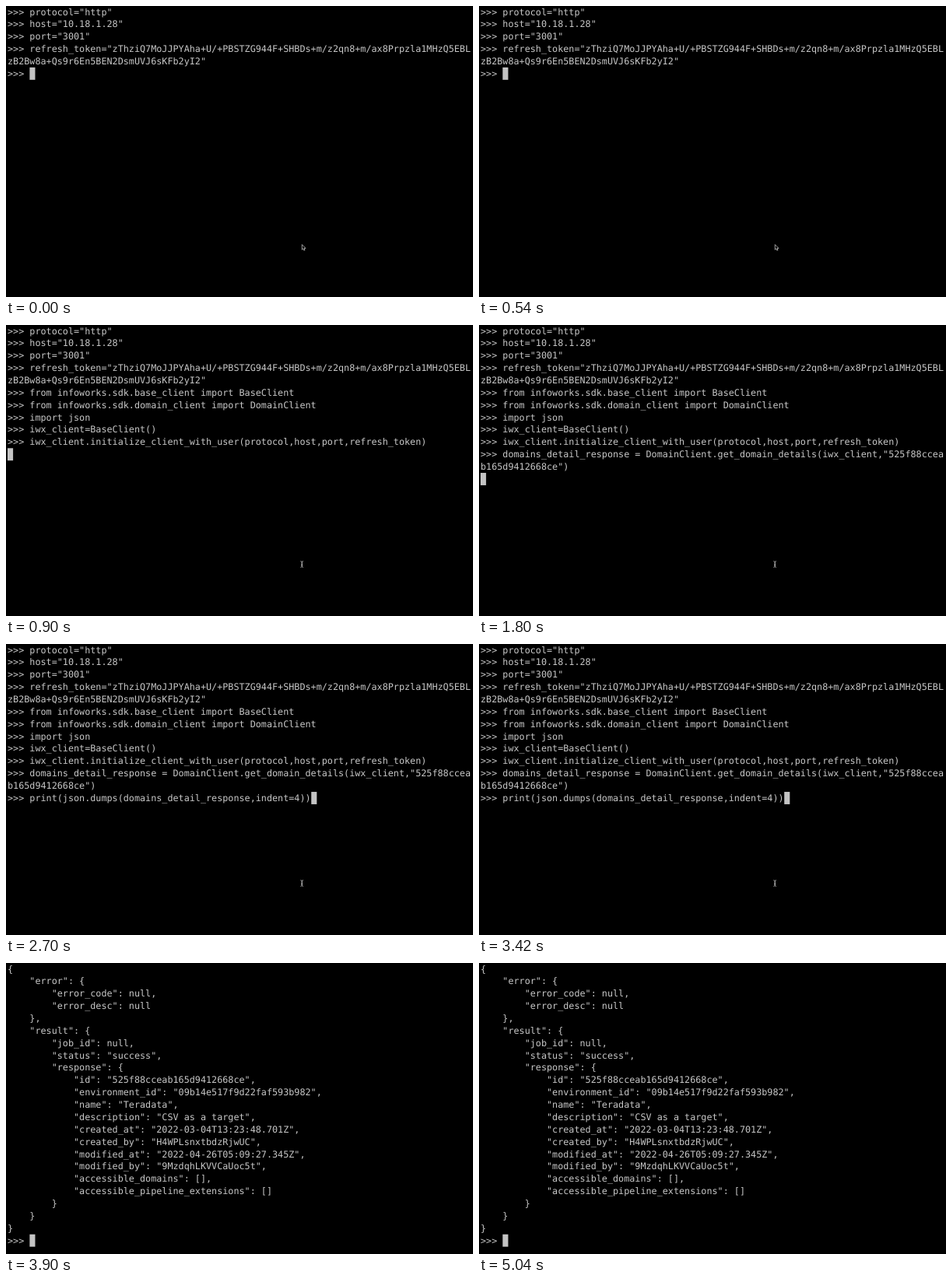
An HTML page for the animation above (5800 ms loop, 600 by 374 pixels).

```html
<!DOCTYPE html>
<html lang="en">
<head>
<meta charset="utf-8">
<title>Python session</title>
<style>
html, body { margin: 0; width: 100%; height: 100%; overflow: hidden; background: #000; }
svg { display: block; width: 100%; height: 100%; }
text {
  font-family: "DejaVu Sans Mono", monospace;
  font-size: 11.786px;
  fill: #c7c7c7;
  white-space: pre;
  text-rendering: geometricPrecision;
}
</style>
</head>
<body>
<svg viewBox="0 0 600 374">
  <rect width="600" height="374" fill="#000"/>
  <rect id="cursor" width="7.1" height="15.9" fill="#c4c4c4"/>
  <g id="screen"></g>
  <path id="arrow" d="M380.3 306.6v6.6l1.5-1.4 1 2.3 1.2-.5-1-2.2h2z"
        fill="#000" stroke="#ddd" stroke-width=".7"/>
  <path id="beam" d="M378.4 303.6q1.8 0 1.8 1.2v5.4q0 1.2-1.8 1.2M382 303.6q-1.8 0-1.8 1.2v5.4q0 1.2 1.8 1.2M379.2 308.4h2"
        fill="none" stroke="#bbb" stroke-width=".8"/>
</svg>
<script>
const NS = "http://www.w3.org/2000/svg";
const LOOP = 5800, COLUMNS = 84;
const LEFT = 2, TOP = -0.4, CHAR = 7.095, ROW = 15.87, BASELINE = 11.9;
const byId = id => document.getElementById(id);

const commands = [
  'protocol="http"',
  'host="10.18.1.28"',
  'port="3001"',
  'refresh_token="zThziQ7MoJJPYAha+U/+PBSTZG944F+SHBDs+m/z2qn8+m/ax8Prpzla1MHzQ5EBLzB2Bw8a+Qs9r6En5BEN2DsmUVJ6sKFb2yI2"',
  'from infoworks.sdk.base_client import BaseClient',
  'from infoworks.sdk.domain_client import DomainClient',
  'import json',
  'iwx_client=BaseClient()',
  'iwx_client.initialize_client_with_user(protocol,host,port,refresh_token)',
  'domains_detail_response = DomainClient.get_domain_details(iwx_client,"525f88cceab165d9412668ce")',
  'print(json.dumps(domains_detail_response,indent=4))'
].map(line => ">>> " + line);

const output = JSON.stringify({
  error: { error_code: null, error_desc: null },
  result: {
    job_id: null,
    status: "success",
    response: {
      id: "525f88cceab165d9412668ce",
      environment_id: "09b14e517f9d22faf593b982",
      name: "Teradata",
      description: "CSV as a target",
      created_at: "2022-03-04T13:23:48.701Z",
      created_by: "H4WPLsnxtbdzRjwUC",
      modified_at: "2022-04-26T05:09:27.345Z",
      modified_by: "9MzdqhLKVVCaUoc5t",
      accessible_domains: [],
      accessible_pipeline_extensions: []
    }
  }
}, null, 4).split("\n");

// The block cursor always follows the last character of the last line.
const scenes = [
  { at: 0, lines: [...commands.slice(0, 4), ">>> "], pointer: "arrow" },
  { at: 900, lines: [...commands.slice(0, 9), ""], pointer: "beam" },
  { at: 1800, lines: [...commands.slice(0, 10), ""], pointer: "beam" },
  { at: 2700, lines: commands, pointer: "beam" },
  { at: 3900, lines: [...output, ">>> "], pointer: "" }
];

const wrap = line => line.match(new RegExp(`.{1,${COLUMNS}}`, "g")) || [""];

let shown;

function draw(time) {
  const scene = scenes.findLast(s => s.at <= time);
  if (scene === shown) return;
  shown = scene;

  const rows = scene.lines.flatMap(wrap);
  byId("screen").replaceChildren(...rows.map((row, i) => {
    const text = document.createElementNS(NS, "text");
    text.setAttribute("x", LEFT);
    text.setAttribute("y", TOP + i * ROW + BASELINE);
    text.textContent = row;
    return text;
  }));

  byId("cursor").setAttribute("x", LEFT + rows.at(-1).length * CHAR);
  byId("cursor").setAttribute("y", TOP + (rows.length - 1) * ROW);
  for (const id of ["arrow", "beam"]) {
    byId(id).style.display = id === scene.pointer ? "" : "none";
  }
}

const start = performance.now();
function tick() {
  draw((performance.now() - start) % LOOP);
  requestAnimationFrame(tick);
}
tick();
</script>
</body>
</html>
```
